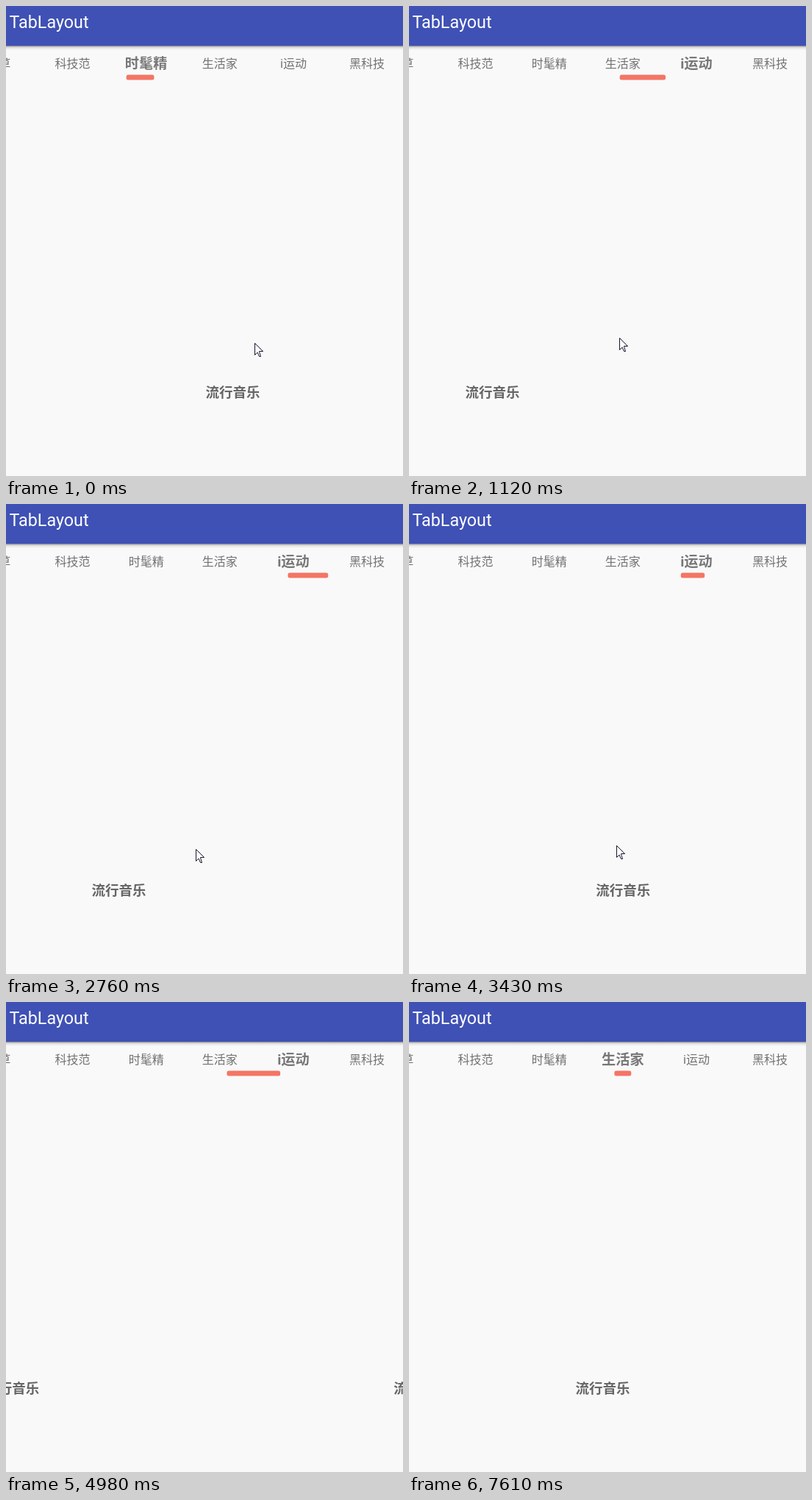
Write an HTML page with a canvas that moves like this. It is 540x639 px and loops after 8.47 s.

```html
<!DOCTYPE html>
<html lang="zh-CN">
<head>
<meta charset="utf-8">
<title>TabLayout</title>
<style>
  html, body { margin: 0; overflow: hidden; background: #f9f9f9; }
  canvas { display: block; }
</style>
</head>
<body>
<canvas width="540" height="639"></canvas>
<script>
const ctx = document.querySelector('canvas').getContext('2d');
const LOOP = 8470, STEP = 135;
const PAGE = 556, PAGE_CENTER = 263.5, TAB = 100.15, BAR = 22.9;
const FONTS = 'Roboto, "Noto Sans CJK SC", sans-serif';
const tabs = ['种草', '科技范', '时髦精', '生活家', 'i运动', '黑科技'];

// Turning points of the swipes: time, pager position
const swipes = [
  [0, 1.919], [160, 2], [570, 2.4], [710, 2.95], [1120, 3.27], [1250, 4],
  [2760, 4.198], [3020, 4.4], [3580, 3.5], [3730, 4], [4290, 4.264],
  [4980, 3.459], [5280, 4], [5950, 4.42], [6340, 4], [6770, 4],
  [7050, 3.66], [7200, 3.36], [7610, 3], [LOOP, 3]
];

// Pointer path: time, x, y; it leaves the stage on long drags
const pointer = [
  [0, 338, 458], [1120, 286, 451], [2760, 258, 468.5], [4290, 326, 456.5],
  [4980, 774, 456], [6340, 358, 446.5], [7200, 620, 448], [LOOP, 620, 448]
];

const segment = (keys, t) => {
  const i = keys.findIndex(k => k[0] > t);
  return [keys[i - 1], keys[i]];
};

function sample(keys, t) {
  const [a, b] = segment(keys, t);
  const u = (t - a[0]) / (b[0] - a[0]);
  return a.slice(1).map((v, i) => v + (b[i + 1] - v) * u);
}

// The picture advances in equal steps between turning points
function stepTime(t) {
  const [[start], [end]] = segment(swipes, t);
  const step = (end - start) / Math.max(1, Math.round((end - start) / STEP));
  return start + Math.floor((t - start) / step) * step;
}

const selectedTab = t => t < 710 ? 2 : t < 1120 ? 3 : t < 7200 ? 4 : 3;
const tabCenter = i => 90.5 + (i - 1) * TAB;

function label(text, x, y, size, color, weight = 400, align = 'center') {
  ctx.font = `${weight} ${size}px ${FONTS}`;
  ctx.textAlign = align;
  ctx.fillStyle = color;
  ctx.fillText(text, x, y);
}

function drawAppBar() {
  const shadow = ctx.createLinearGradient(0, 54, 0, 60);
  shadow.addColorStop(0, 'rgba(0,0,0,.45)');
  shadow.addColorStop(0.4, 'rgba(0,0,0,.1)');
  shadow.addColorStop(1, 'rgba(0,0,0,0)');
  ctx.fillStyle = shadow;
  ctx.fillRect(0, 54, 540, 6);
  ctx.fillStyle = '#3f51b5';
  ctx.fillRect(0, 0, 540, 54);
  label('TabLayout', 4.5, 30, 23.3, '#fff', 400, 'left');
}

function drawTabs(selected) {
  tabs.forEach((name, i) => i === selected
    ? label(name, tabCenter(i), 85, 19.2, '#777', 700)
    : label(name, tabCenter(i), 83.7, 16, '#727272'));
}

// The leading edge decelerates while the trailing edge accelerates
function drawBar(pos) {
  const i = Math.floor(pos), f = pos - i;
  const start = tabCenter(i) - BAR / 2;
  const left = start + TAB * f * f;
  const right = start + BAR + TAB * (1 - (1 - f) ** 2);
  ctx.fillStyle = '#f47565';
  ctx.beginPath();
  ctx.roundRect(left, 93.6, right - left, 6.9, 2.5);
  ctx.fill();
}

function drawPages(pos) {
  for (const i of [Math.floor(pos), Math.floor(pos) + 1])
    label('流行音乐', PAGE_CENTER + (i - pos) * PAGE, 531.6, 18.5, '#666', 700);
}

const arrow = new Path2D('M0 0V16L3.5 12.5L6 18H8L6 11.5V11H11Z');
function drawPointer(x, y) {
  ctx.save();
  ctx.translate(Math.round(x) + 0.5, Math.round(y) + 0.5);
  ctx.fillStyle = '#fff';
  ctx.fill(arrow);
  ctx.strokeStyle = '#15152a';
  ctx.stroke(arrow);
  ctx.restore();
}

function draw(now) {
  const t = stepTime(now % LOOP);
  const [pos] = sample(swipes, t);
  ctx.fillStyle = '#f9f9f9';
  ctx.fillRect(0, 0, 540, 639);
  drawAppBar();
  drawTabs(selectedTab(t));
  drawBar(pos);
  drawPages(pos);
  drawPointer(...sample(pointer, t));
  requestAnimationFrame(draw);
}
requestAnimationFrame(draw);
</script>
</body>
</html>
```
